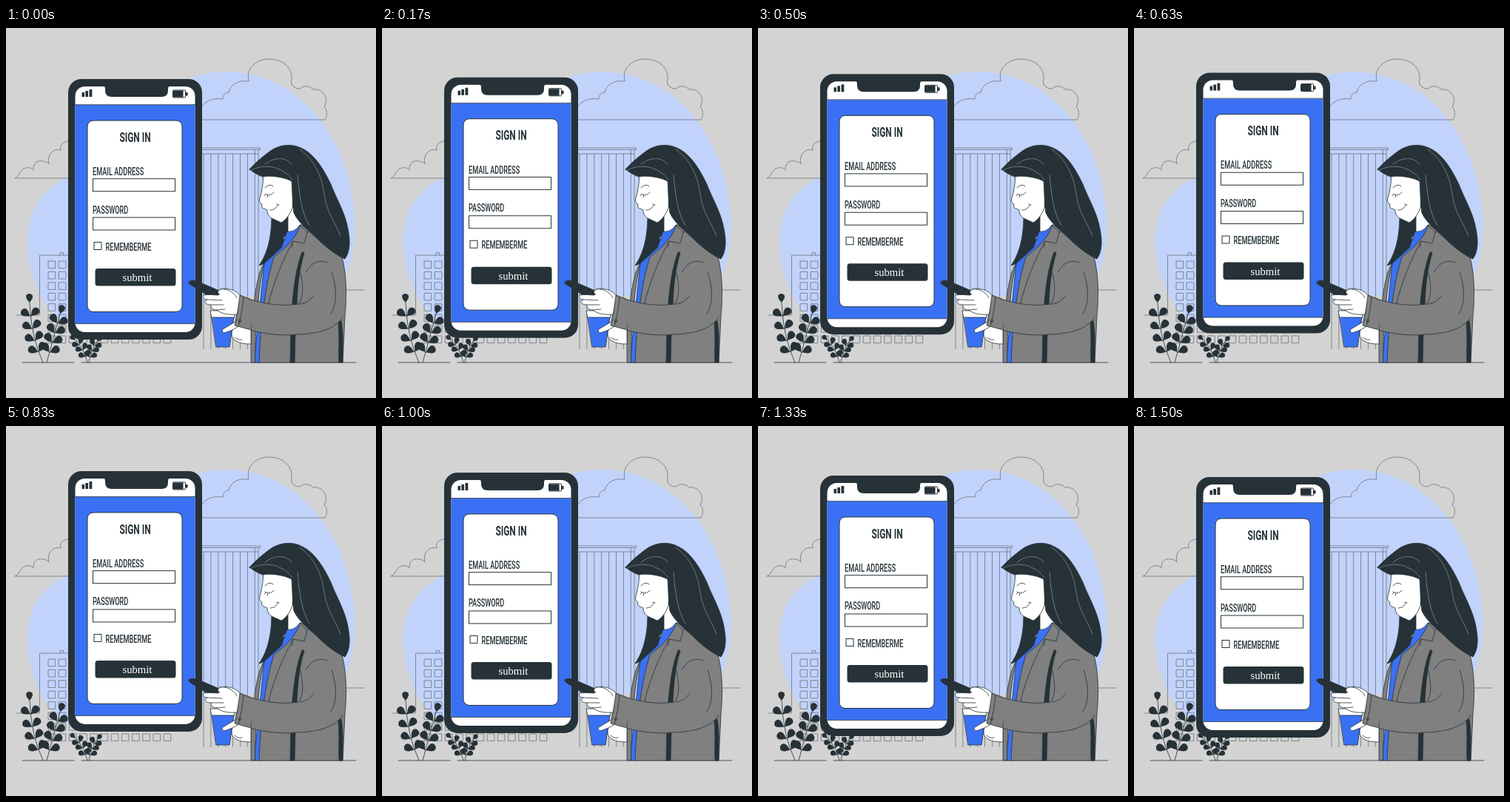
These frames come from a looping animation (500 px wide and 500 px high, 1.54 s). An HTML page:

```html
<!DOCTYPE html>
<html lang="en">
<head>
<meta charset="utf-8">
<title>Sign in</title>
<style>
  html, body { margin: 0; width: 100%; height: 100%; overflow: hidden; background: #d3d3d3; }
  svg { display: block; width: 100vw; height: 100vh; }
  .thin { fill: none; stroke: #5d666c; stroke-width: .7; }
  .ink { fill: none; stroke: #263238; stroke-width: .8; stroke-linecap: round; stroke-linejoin: round; }
  .dark { fill: #263238; }
  .blue { fill: #3a71f4; }
  .white { fill: #fff; }
  .coat { fill: #808080; }
  .box { fill: #fff; stroke: #263238; stroke-width: 1; }
  .narrow { font-family: Roboto, "Liberation Sans", sans-serif; font-size: 14.1px; font-weight: 500; fill: #263238; }
  .submit { font-family: "Liberation Serif", "Times New Roman", serif; font-size: 14.67px; fill: #fff; }
</style>
</head>
<body>
<svg viewBox="0 0 500 500">
  <path fill="#c1d3fb" d="M29 286C29 242 56 210 90 200C190 164 190 59 296 59C384 59 438 125 459 190C476 245 476 308 455 342C425 376 340 350 265 371C200 390 150 418 96 408C50 388 29 335 29 286Z"/>

  <!-- clouds and horizon -->
  <g class="thin">
    <path d="M258 124H431C435 118 434 110 430 107C437 95 428 81 415 83C409 77 401 78 397 82C388 82 384 76 386 69C387 52 372 41 353 42C336 43 324 56 328 72C315 70 304 75 301 87C296 87 293 91 293 96C281 94 270 98 264 107"/>
    <path d="M90 203H12C18 201 20 190 27 189C32 188 35 190 37 192C36 184 42 178 49 180C54 180 57 182 58 184C55 171 64 162 74 165C72 157 78 152 90 153"/>
    <path d="M14 388H45M458 354H484"/>
  </g>

  <!-- buildings -->
  <g class="thin">
    <path id="tower" d="M258 162H343.500V164.500H258M258 170H341"/>
    <path d="M45.500 388V307H90M73 307V303.500H77.500V307"/>
    <path id="windows"/>
  </g>

  <path class="ink" d="M22 452H92M102 452H473"/>
  <g id="plants" class="dark"></g>

  <!-- large phone -->
  <g id="phone">
    <rect class="dark" x="84" y="69" width="181" height="352" rx="18"/>
    <rect class="white" x="93.500" y="79" width="162" height="332" rx="13"/>
    <path class="dark" d="M131 78C134 79 134 81 134 84C134 90 137 93 143 93H210C216 93 219 90 219 84C219 81 219 79 222 78Z"/>
    <rect class="blue" x="93.500" y="104" width="162" height="295.500"/>
    <path class="ink" d="M93 103.600H256M93 399.600H256"/>
    <path class="dark" d="M102.500 87H106V93H102.500ZM107.300 85H111V93H107.300ZM112.500 83H116.300V93H112.500Z"/>
    <rect class="box" x="225.500" y="84" width="17" height="10" rx="1"/>
    <path class="dark" d="M226 84.500H239.500V93.500H226ZM243 87H245.500V91.500H243Z"/>
    <rect class="box" x="110" y="125" width="128" height="258.500" rx="8"/>
    <g id="labels" class="narrow"></g>
    <rect class="box" x="117.500" y="203.700" width="111" height="17"/>
    <rect class="box" x="117.500" y="256" width="111" height="17"/>
    <rect class="box" x="119" y="289.500" width="10" height="10"/>
    <rect class="dark" x="120.500" y="325" width="109" height="23.500" rx="3.500"/>
    <text class="submit" x="157.500" y="342">submit</text>
  </g>

  <!-- woman -->
  <g class="ink">
    <path class="dark" d="M358 236C361 268 357 300 342 321C364 314 380 300 392 272L394 236Z"/>
    <path class="white" d="M381 246V276L373 286L402 272L394 238Z"/>
    <path class="blue" d="M380 275C388 276 393 272 397 266L405 273L370 313L344 452H335L349 318L372 297Z"/>
    <path class="coat" d="M349 318C342 327 338 348 335 372L331 400V452H336.500C337 405 340 355 349 318Z"/>
    <path class="coat" d="M398 266C420 274 445 288 453 306C460 328 461 360 458 390L455 452H342C344 405 349 350 362 309C376 298 390 288 398 266Z"/>
    <path d="M398 267L407 276L403 291L388 288C378 306 362 340 355 372M407 276L414 272M388 288L386 297"/>
    <path class="dark" d="M400 303C392 324 389 348 386.500 376L393 375C394 350 396 326 403 304ZM385 410L384 452H390L391 410ZM449 398C451 420 449 436 450 452H455C455 430 456 412 453 396Z"/>
    <path class="coat" d="M405 330C412 318 422 312 434 317M398 331C402 350 402 362 396 373C370 377 340 372 316 361C314 377 312 390 309 402C338 412 367 417 395 414C423 413 444 407 455 391"/>
    <path d="M440 330C447 350 448 372 439 386M398 373C405 372 411 368 415 362M321 364C320 378 317 392 314 403"/>
    <circle cx="316" cy="396" r="1.600"/>
    <path class="white" d="M347 190C349 206 346 220 342.500 232C342 235 344 237 346 238C345 241 346 244 349 244L353 246C353 252 356 256 361 258L372 263C379 259 384 251 387 243L390 200Z"/>
    <path class="dark" d="M329 191C338 181 348 173 356 167C368 158 384 156 396 161C415 168 428 188 439 211C446 230 456 245 461 266C466 288 465 302 458 312C450 309 432 297 419 283C405 271 394 261 389 250C387 237 387 221 386 207C375 201 356 199 347 201C341 199 336 196 329 191Z"/>
    <path d="M350 216C353 212 358 211 361 214M350 224C354 227 359 226 362 222M351 225L349 227M354 226L353 229M357 246C362 246 366 243 367 239M366 238L369 239"/>
    <path stroke="#8c979c" stroke-width=".7" d="M332 192C346 184 371 184 387 205M350 184C363 174 378 174 386 184M397 164C417 178 427 201 430 225C433 248 445 263 452 281M394 198C396 222 399 250 410 267"/>
  </g>

  <!-- cup, hands, handset -->
  <g class="ink">
    <path class="blue" d="M278 390H308L302 431H284Z"/>
    <path class="white" d="M276.500 382H310L308.500 391H278Z"/>
    <path class="white" d="M331 399C323 398 317 394 310 397L293 407C291 411 294 413 298 411L306 408C304 414 305 420 311 423C317 427 325 427 331 427V399Z"/>
    <path d="M306 408L313 404M309 418C312 421 316 422 319 421"/>
    <path class="white" d="M317 362C311 354 301 351 289 353L284 359L267 361C265 364 268 367 272 367L269 369C269 373 273 374 277 374C276 378 280 381 285 381C290 386 301 388 312 387Z"/>
    <path class="dark" d="M247 343C249 341 254 341 258 342L288 355C291 357 290 360 286 361L270 360L248 346Z"/>
    <path class="white" d="M287 359C285 355 289 352 295 353C302 354 309 358 312 365"/>
    <path d="M272 367L292 368M277 374L294 374M285 381L296 380"/>
    <path class="coat" d="M331 367L316 361C314 377 312 390 309 402L331 408"/>
    <path d="M321 364C320 378 317 392 314 403"/>
    <circle cx="316" cy="396" r="1.600"/>
  </g>
</svg>
<script>
const LOOP = 1540, STEPS = 37, PEAK = 17, RISE = 9.6;
const $ = id => document.getElementById(id);

function add(parent, tag, attrs, text) {
  const el = document.createElementNS("http://www.w3.org/2000/svg", tag);
  for (const key in attrs) el.setAttribute(key, attrs[key]);
  if (text) el.textContent = text;
  return parent.appendChild(el);
}

function label(text, x, y, style = "") {
  add($("labels"), "text", { transform: `translate(${x} ${y}) scale(.65 1)`, style }, text);
}
label("SIGN IN", 153.5, 153.6, "font-size:18.3px;font-weight:700");
label("EMAIL ADDRESS", 117, 198.8);
label("PASSWORD", 117, 250.5);
label("REMEMBERME", 134.5, 300.7);

let bars = "", panes = "";
for (let i = 0; i < 8; i++) bars += `M${267 + i * 9.9} ${i == 7 ? 164 : 170}V434`;
bars += "M341 165V434";
$("tower").setAttribute("d", $("tower").getAttribute("d") + bars);
for (let row = 0; row < 8; row++)
  for (let col = 0; col < 12; col++)
    panes += `M${57 + col * 14.2} ${315 + row * 14.43}h9.6v9.6h-9.6z`;
$("windows").setAttribute("d", panes);

function leaf(x, y, angle, size) {
  add($("plants"), "path", {
    d: "M0 0C.25-.06.4-.36.75-.34C.93-.32 1-.1 1 0C1 .1.93.32.75.34C.4.36.25.06 0 0Z",
    transform: `translate(${x} ${y}) rotate(${angle}) scale(${size})`
  });
}

// Curved stem with leaf pairs along it and one leaf at the tip
function stem([x0, y0], [cx, cy], [x1, y1], pairs, size) {
  add($("plants"), "path", { class: "ink", d: `M${x0} ${y0}Q${cx} ${cy} ${x1} ${y1}` });
  const mix = (a, b, c, u) => (1 - u) ** 2 * a + 2 * u * (1 - u) * b + u * u * c;
  for (let i = 0; i <= pairs; i++) {
    const u = .2 + .8 * i / pairs;
    const x = mix(x0, cx, x1, u), y = mix(y0, cy, y1, u);
    const dx = (1 - u) * (cx - x0) + u * (x1 - cx);
    const dy = (1 - u) * (cy - y0) + u * (y1 - cy);
    const angle = Math.atan2(dy, dx) * 180 / Math.PI;
    if (i == pairs) leaf(x, y, angle, size);
    else for (const side of [-50, 50]) leaf(x, y, angle + side, size * 1.15);
  }
}
stem([50, 452], [34, 418], [32, 372], 4, 13);
stem([55, 452], [64, 418], [73, 387], 4, 13);
stem([110, 452], [105, 432], [94, 422], 3, 9);
stem([112, 452], [115, 434], [123, 424], 3, 9);

function draw(time) {
  const n = Math.min(STEPS - 1, Math.floor((time % LOOP + 5) * STEPS / LOOP));
  const part = n < PEAK ? n / PEAK : (STEPS - 1 - n) / (STEPS - 1 - PEAK);
  $("phone").setAttribute("transform", `translate(0 ${(-RISE * part).toFixed(2)})`);
}

function tick() {
  draw(performance.now());
  requestAnimationFrame(tick);
}
tick();
</script>
</body>
</html>
```
